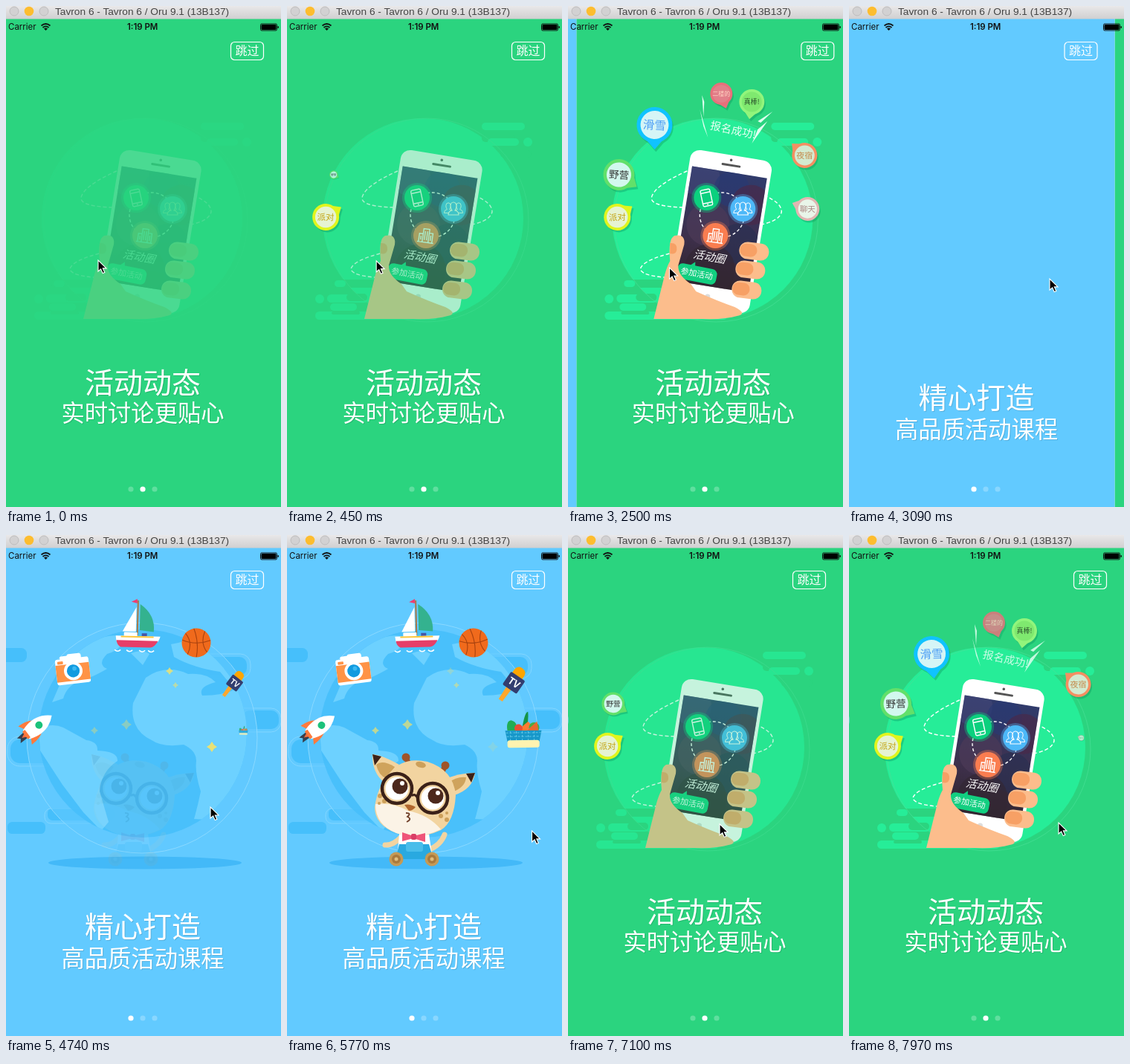
An HTML page for the animation above (8 s loop, 370 by 674 pixels).

```html
<!DOCTYPE html>
<html lang="zh">
<head>
<meta charset="utf-8">
<title>Onboarding</title>
<style>
  html, body { margin: 0; width: 100%; height: 100%; overflow: hidden; }
  svg { display: block; width: 100%; height: 100%; }
  text { font-family: "Noto Sans CJK SC", "Noto Sans CJK", sans-serif; text-anchor: middle; }
  .chrome text { font-family: Inter, sans-serif; text-anchor: start; }
  .head { fill: #fff; font-weight: 300; filter: drop-shadow(1px 1px 0 #0002); }
  .line { fill: none; stroke: #fff; stroke-width: 1.4; }
  .dash { stroke-dasharray: 5 3; }
</style>
</head>
<body>
<svg id="stage" viewBox="0 0 370 674"></svg>
<script>
const CYCLE = 8000, WIDTH = 370;
const clamp = v => Math.max(0, Math.min(1, v));

function track(keys, t) {
  let i = 1;
  while (i < keys.length - 1 && keys[i][0] < t) i++;
  const [a, b] = [keys[i - 1], keys[i]];
  const u = clamp((t - a[0]) / (b[0] - a[0]));
  return a.slice(1).map((v, k) => v + (b[k + 1] - v) * u);
}

const circle = (x, y, r, fill, more = '') => `<circle cx="${x}" cy="${y}" r="${r}" fill="${fill}" ${more}/>`;
const oval = (x, y, rx, ry, fill, more = '') => `<ellipse cx="${x}" cy="${y}" rx="${rx}" ry="${ry}" fill="${fill}" ${more}/>`;
const rect = (x, y, w, h, r, fill, more = '') => `<rect x="${x}" y="${y}" width="${w}" height="${h}" rx="${r}" fill="${fill}" ${more}/>`;
const shape = (d, fill, more = '') => `<path d="${d}" fill="${fill}" ${more}/>`;
const line = (d, more = 'class="line"') => `<path d="${d}" ${more}/>`;
const label = (x, y, size, fill, text, more = '') =>
  `<text x="${x}" y="${y}" font-size="${size}" fill="${fill}" ${more}>${text}</text>`;
const group = (transform, body, more = '') => `<g transform="${transform}" ${more}>${body}</g>`;

const page = (id, color, art, title, titleY, subtitle, subtitleY) => `<g id="${id}">
  ${rect(0, 17, WIDTH, 657, 0, color)}${art}
  ${rect(302.5, 48.5, 44, 24, 5, 'none', 'stroke="#fff" stroke-width="1.2"')}
  ${label(324.5, 66, 16, '#fff', '跳过', 'font-weight="300"')}
  ${label(184, titleY, 39, '#fff', title, 'class="head"')}
  ${label(184, subtitleY, 31.3, '#fff', subtitle, 'class="head"')}</g>`;

// A speech balloon centred on the origin; the tail points along `angle`.
function balloon(r, color, inner, ink, text, size, angle) {
  const tail = `M${r * .3} ${-r * .93}L${r * 1.38} 0L${r * .3} ${r * .93}Z`;
  return group('translate(2 3)', group(`rotate(${angle})`, shape(tail, '#0a8f5a')) + circle(0, 0, r - .5, '#0a8f5a'), 'opacity=".35"') +
    group(`rotate(${angle})`, shape(tail, color)) + circle(0, 0, r, color) +
    circle(0, 0, r * .79, inner) + label(0, size * .37, size, ink, text);
}

// ---------- green scene ----------
const greenBackdrop = () =>
  circle(183, 286, 135, '#26ed98') +
  rect(262, 157, 58, 10, 5, '#26ed98') + rect(262, 173, 45, 10, 5, '#2bd47f') +
  rect(270, 178, 42, 10, 5, '#26ed98') + rect(287, 194, 42, 10, 5, '#2bd47f') +
  circle(324, 183, 6, '#26ed98') + circle(44, 394, 6, '#26ed98') +
  rect(61, 368, 60, 11, 5.5, '#2bd47f') + rect(64, 369, 15, 9, 4.5, '#26ed98') +
  rect(54, 388, 55, 11, 5.5, '#26ed98') + rect(80, 387, 28, 10, 5, '#2bd47f') +
  rect(58, 400, 36, 10, 5, '#26ed98') + rect(38, 411, 165, 11, 5.5, '#26ed98') +
  rect(60, 411, 38, 4, 2, '#2bd47f') +
  circle(188, 288, 137, 'none', 'stroke="#48e096" opacity=".7"');

const peopleIcon = [-7, 7, 0].map(x =>
  group(`translate(${x} ${x ? 0 : 1}) scale(${x ? .8 : 1})`,
    shape('M-7 8Q-7 3 -2 2Q-4 -1 -4 -4A4 5 0 0 1 4 -4Q4 -1 2 2Q7 3 7 8Z', '#4db8f8', 'stroke="#fff" stroke-width="1.2"'))).join('');

const phone = () => group('translate(155 192) rotate(9.2)',
    rect(0, 0, 111, 208, 13, '#fff') +
    rect(4.5, 23, 102, 156, 0, 'url(#photo)') +
    `<g clip-path="url(#screen)">` +
      [[18, 36, 26, '#414677'], [62, 45, 24, '#283a73'], [91, 62, 27, '#4a2949'], [38, 97, 29, '#4d3b58'], [83, 116, 27, '#293052'], [50, 156, 34, '#332733']]
        .map(([x, y, r, c]) => circle(x, y, r, c, 'opacity=".65"')).join('') + `</g>` +
    rect(43, 12, 26, 3, 1.5, '#555') + circle(55, 6.5, 1.8, '#555') + circle(53, 193, 3.5, '#ddd')) +
  circle(196, 281, 30, 'none', 'class="line" stroke-dasharray="4 3"') +
  [[175, 258, '#0bd07e'], [224, 273, '#4db8f8'], [187, 309, '#fa7d50']]
    .map(([x, y, c]) => circle(x, y, 20, c, 'opacity=".35"') + circle(x, y, 17, c)).join('') +
  group('translate(175 258) rotate(-12)',
    rect(-6.5, -11, 13, 22, 2, 'none', 'class="line"') + line('M-6.5 -7H6.5M-6.5 7H6.5M-1 9H1')) +
  group('translate(224 272)', peopleIcon) +
  group('translate(187 309) rotate(8)', line('M-11 9H11M-9 9V-2H-4V9M-4 9V-9H4V9M4 -4H9V9M-1.5 -6V6M1.5 -6V6M-6.5 1V6M6.5 -1V6')) +
  group('translate(179 337) rotate(10)', label(0, 5.5, 14.6, '#fff', '活动圈', 'font-weight="500" font-style="italic"')) +
  group('translate(162 360) rotate(11)',
    rect(-27, -10, 54, 21, 7, '#12cf80') + shape('M-11 -9L-5 -15L-4 -9Z', '#12cf80') + label(0, 4, 11, '#fff', '参加活动'));

const finger = (x, y) => group(`translate(${x} ${y}) rotate(7)`,
  rect(-20, -11.5, 40, 23, 11, '#fcbd8c') + rect(-19, -9, 23, 17, 8, '#f7a065'));

const hand = () =>
  shape('M104 421L119 361Q122 350 126 343Q123 313 132 309Q147 306 145 321L137 349Q136 362 154 374L161 384Q190 397 213 405Q231 414 216 417Q200 422 170 421Z', '#fcbd8c') +
  shape('M126 319Q136 318 135 328Q134 335 126 333Z', '#f7a065') +
  [[239, 330], [234, 355], [229, 382]].map(p => finger(...p)).join('');

const orbits = [
  'M149 222Q104 242 101 258Q100 270 146 271',
  'M252 255Q276 264 276 277Q273 291 238 296',
  'M133 331Q88 342 86 354Q89 365 138 366'
].map(d => line(d, 'class="line dash"')).join('');

const banner =
  group('rotate(12)', label(0, 5, 14.5, '#eafff4', '报名成功!', 'font-weight="300"')) +
  ['M-42 -47L-39 -38L-40 -18Z', 'M-45 -28L-34 10L-40 -5Z', 'M53 -25L33 -12L37 -10Z', 'M46 -12L25 18L33 -1Z']
    .map(d => shape(d, '#dffff0')).join('');

const greenItems = [
  { x: 53, y: 284, start: 330, sway: -2, body: balloon(18, '#e0f51e', '#e6f3d2', '#c3a415', '派对', 11.5, -34) },
  { x: 61, y: 227, start: 580, sway: 4, body: balloon(21, '#62e06a', '#d2f8ee', '#333', '野营', 13.5, 30) },
  { x: 109, y: 160, start: 830, sway: 4, body: balloon(24, '#10c3ff', '#d5f5f6', '#4c9df5', '滑雪', 15.5, 86) },
  { x: 195, y: 118, start: 1090, fade: 650, body: balloon(15, '#e8707b', '#e2808a', '#ffd2c0', '二楼的', 8, 72) },
  { x: 236, y: 129, start: 900, fade: 650, body: balloon(17, '#92f57c', '#7fe96f', '#28502b', '真棒!', 9, 98) },
  { x: 211, y: 167, start: 1090, fade: 650, body: banner },
  { x: 308, y: 201, start: 1330, sway: 1, body: balloon(17, '#f58f62', '#d3ead0', '#c58a4d', '夜宿', 11, 222) },
  { x: 312, y: 273, start: 1580, sway: 1, body: balloon(16, '#e0b6b2', '#e9f5e9', '#a98480', '聊天', 10.5, 200) }
];

// ---------- blue scene ----------
const DEEP = '#46bffb', LAND = '#6dd1ff';
const blueBackdrop = () =>
  oval(187, 441, 130, 8.5, '#43b9f8') +
  [[-10, 152, 38, 19], [6, 275, 60, 32], [56, 367, 90, 17], [2, 386, 51, 16], [270, 164, 54, 25], [318, 236, 49, 25]]
    .map(([x, y, w, h]) => rect(x, y, w, h, h / 2.5, DEEP)).join('') +
  [[2, 271, 70, 40], [52, 368, 80, 20], [255, 160, 74, 33], [288, 233, 82, 32]]
    .map(([x, y, w, h]) => rect(x, y, w, h, h / 2.4, 'none', 'stroke="#82d6ff"')).join('') +
  circle(183, 273, 155, '#62caff', 'fill-opacity=".6" stroke="#8ad9ff"') +
  circle(184, 267, 140, DEEP, 'opacity=".85"') +
  `<g clip-path="url(#globe)">` + [
    'M44 262Q60 252 77 259L108 276Q124 278 123 290Q151 291 150 304Q128 318 126 345L138 386L128 398L104 373L76 336L46 290Z',
    'M62 225L88 165Q130 128 156 137Q158 154 136 160Q122 174 136 180Q112 194 100 195Q81 204 77 220Z',
    'M188 192Q215 173 245 187Q270 185 282 198Q258 204 264 216Q292 216 310 207L335 220V320L300 385L253 382Q258 365 262 345Q254 320 256 304Q256 290 239 282Q210 286 196 276Q166 262 171 226Z',
    'M222 147Q250 142 262 130L335 170V230L308 208L288 184Q250 178 226 164Z',
    'M168 159Q183 153 193 160L184 175Z'
  ].map(d => shape(d, LAND)).join('') + `</g>`;

const rocket = group('translate(2 0) rotate(-36) scale(.9)',
  shape('M-18 -5L-32 -4L-28 0L-32 5L-18 5Z', '#38404d') + shape('M-17 -4L-26 0L-17 4Z', '#ff6b3a') +
  shape('M-15 -8L-20 -17Q-2 -17 5 -9Z', '#ff7a3c') + shape('M-15 8L-20 17Q-2 17 5 9Z', '#ff7a3c') +
  shape('M-18 -8Q10 -19 30 0Q10 19 -18 8Z', '#fff') + rect(-20, -7, 5, 14, 1, '#ff7a3c') + circle(6, 0, 5.5, '#1bc27b'));

const camera = group('rotate(-7) scale(.96)',
  rect(-16, -20, 13, 6, 2, '#fff') + rect(-6, -22, 20, 9, 3, '#fff') + rect(-23, -16, 47, 36, 3, '#fff') +
  rect(-23, -8, 47, 24, 0, '#ff9346') + rect(-20, -13, 8, 4, 1, '#ff9346') +
  circle(1, 2, 13, '#fff') + circle(1, 2, 9, '#129be0') + circle(3, -1, 3, '#3cb9f2'));

const boat =
  rect(-1, -34, 2, 47, 0, '#a87945') + shape('M-1 -36L-9 -32L-1 -30Z', '#ee3d72') +
  shape('M-2 -25L-20 8H-2Z', '#fff') + shape('M3 -29Q24 -15 22 8L3 6Z', '#34b28f') +
  rect(-18, 9, 18, 6, 1, '#fff') + rect(6, 10, 7, 5, 0, '#4556a5') +
  shape('M-29 14H31Q30 18 28 21H-28Z', '#fff') + shape('M-22 14H22V16H-22Z', '#ffc83d') +
  shape('M-28 20H28Q24 28 18 29H-22Q-27 27 -28 20Z', '#e63e68') +
  [-25, -9, 8, 20].map(x => line(`M${x - 5} 33q4 4 8 0`, 'fill="none" stroke="#fff" stroke-width="1.5"')).join('');

const ball = circle(0, 0, 19.5, '#f06a1c') +
  line('M-19 -3Q0 4 19 -4M-4 -19Q4 0 1 19M-15 -12Q-4 0 -11 16M11 -16Q5 0 15 12', 'fill="none" stroke="#a9420f" stroke-width="1.1"');

const mic = group('rotate(36)',
  shape('M-4 2H4L3 27H-3Z', '#ffa72c') + rect(-8, -25, 16, 20, 7, '#ffa500') + rect(-10, -13, 23, 21, 2, '#333e70') +
  label(1.5, 2, 13, '#fff', 'TV', 'font-weight="700"'));

const basket =
  shape('M-2 -4Q2 -26 6 -25Q7 -12 3 -2Z', '#159447') + shape('M-22 0Q-24 -13 -17 -14Q-8 -12 -9 0Z', '#21ad54') +
  shape('M-10 1L6 -12L11 -7L1 3Z', '#ff7a31') + circle(-7, -3, 5.5, '#e84e36') + circle(14, -4, 7, '#49ad45') + shape('M4 0L18 -12L20 1Z', '#e8692f') +
  shape('M-25 0H24L21 15H-22Z', '#1797c9') + line('M-24 3H23M-23 8H22M-18 1V14M-10 1V14M-2 1V14M6 1V14M14 1V14', 'stroke="#5cc6e8" stroke-dasharray="3 2"') +
  rect(-22, 13, 43, 10, 3, '#fff3b0');

const blueItems = [
  { x: 39, y: 259, start: 560, sway: -1, body: rocket },
  { x: 89, y: 181, start: 740, sway: .3, body: camera },
  { x: 175.5, y: 122, start: 920, sway: 1.5, body: boat },
  { x: 253.5, y: 145, start: 1100, sway: 2.5, body: ball },
  { x: 304, y: 200, start: 1300, sway: 1.5, body: mic },
  { x: 319, y: 263, start: 1435, sway: .5, body: basket }
];

const stars = [[162, 255, 7, 2], [119, 263, 5, 2], [220, 183, 5, .8], [228, 202, 4, 1.5], [277, 285, 7, 0]];
const star = ([x, y, r]) => group(`translate(${x} ${y})`,
  shape(`M0 ${-r}L${r * .4} ${-r * .4}L${r} 0L${r * .4} ${r * .4}L0 ${r}L${-r * .4} ${r * .4}L${-r} 0L${-r * .4} ${-r * .4}Z`, '#ffe45c'), 'class="star"');

const eye = (x, y) => circle(x, y, 20, '#f2d4a0', 'stroke="#3b2118" stroke-width="4.5"') +
  circle(x, y, 15.5, '#fff') + circle(x + 4, y - 3, 10.5, '#4c281c') + circle(x + 7, y - 7, 3, '#fff');
const shoe = x => circle(x, 436, 9.5, '#c59a55') + circle(x, 436, 6, '#a97a3d') + circle(x, 436, 2.5, '#dfbd7d');

const giraffe = () =>
  line('M153 407Q142 418 132 417M190 424Q207 417 212 403', 'fill="none" stroke="#f2d4a0" stroke-width="7" stroke-linecap="round"') +
  shape('M151 402H191L196 436H148Z', '#fff') + shape('M151 416H191L197 436H146Z', '#29a9e0') + rect(160, 413, 23, 13, 3, '#49bdea') +
  shoe(147) + shoe(195) +
  line('M167 318L161 301M205 327L212 312', 'stroke="#9f5429" stroke-width="7" stroke-linecap="round"') +
  circle(160, 299, 5.5, '#9f5429') + circle(213, 310, 5.5, '#9f5429') +
  shape('M151 309Q128 296 115 295Q114 320 132 334Z', '#f2d4a0') + shape('M115 295L127 298L118 310Z', '#3b2118') + shape('M145 312Q128 302 120 309Q123 323 134 328Z', '#cfa35c') +
  shape('M210 330Q229 320 253 320Q250 342 225 350Z', '#f2d4a0') + shape('M253 320L241 321L248 333Z', '#3b2118') + shape('M215 334Q230 324 241 326Q240 339 224 345Z', '#cfa35c') +
  shape('M139 319Q157 298 189 305Q224 316 227 350Q225 386 207 397Q177 411 147 401Q118 390 118 366Q122 337 139 319Z', '#f2d4a0') +
  shape('M119 362Q142 359 163 371Q190 376 207 396Q176 411 147 401Q119 390 119 362Z', '#fbf3e6') +
  oval(180, 309, 7, 4, '#cda05a', 'transform="rotate(15 180 309)"') +
  [[125, 351, 3], [131, 358, 3], [124, 361, 2], [207, 378, 3], [215, 383, 3], [215, 374, 2]]
    .map(([x, y, r]) => circle(x, y, r, '#cda05a')).join('') +
  eye(148, 341) + eye(196, 354) +
  line('M168 351Q172 347 176 354', 'fill="none" stroke="#3b2118" stroke-width="3"') +
  shape('M158 363Q165 361 173 366Q169 371 164 371Z', '#b1672e') +
  line('M160 374Q168 374 162 379Q169 382 161 386', 'fill="none" stroke="#70402a" stroke-width="1.8"') +
  shape('M170 405L155 400V412L170 408L186 413V401Z', '#ef5579') + rect(167, 402, 7, 8, 2, '#d93e66');

// ---------- assembly ----------
const items = list => list.map(i => `<g class="item">${i.body}</g>`).join('');

const chrome = `<g class="chrome">
  ${rect(0, 0, WIDTH, 17.5, 0, 'url(#bar)')}
  ${circle(11, 7, 6, '#d2d1d2', 'stroke="#bdbcbd"')}${circle(31, 7, 6.3, '#fdbd2f')}${circle(51, 7, 6, '#d2d1d2', 'stroke="#bdbcbd"')}
  ${label(66, 12, 13.7, '#444', 'Tavron 6 - Tavron 6 / Oru 9.1 (13B137)', 'style="font-family:\'Liberation Sans\',sans-serif"')}
  ${label(3, 32, 11.5, '#111', 'Carrier')}
  ${label(163, 32, 11.4, '#111', '1:19 PM', 'font-weight="600"')}
  <g fill="none" stroke="#111" stroke-width="1.7">${line('M47.5 26.5Q53.5 21.5 59.5 26.5M49.5 29Q53.5 25.7 57.5 29', '')}</g>
  ${shape('M51 30.5Q53.5 28.5 56 30.5L53.5 33Z', '#111')}
  ${rect(342.5, 24, 22, 9, 1.5, 'none', 'stroke="#111"')}${rect(343.5, 25, 20, 7, 1, '#000')}${rect(365.5, 27, 1.5, 3, .7, '#111')}</g>`;

const stage = document.getElementById('stage');
stage.innerHTML = `<defs>
  <linearGradient id="bar" x2="0" y2="1"><stop stop-color="#e9e8e9"/><stop offset="1" stop-color="#d0cfd0"/></linearGradient>
  <linearGradient id="photo" x2="0" y2="1"><stop stop-color="#303b6b"/><stop offset=".6" stop-color="#3e304c"/><stop offset="1" stop-color="#30252d"/></linearGradient>
  <clipPath id="screen">${rect(4.5, 23, 102, 156, 0, '#000')}</clipPath>
  <clipPath id="globe">${circle(184, 267, 140, '#000')}</clipPath></defs>` +
  page('green', '#2bd47f', `<g class="backdrop">${greenBackdrop()}${orbits}${phone()}${hand()}</g>${items(greenItems)}`,
    '活动动态', 521, '实时讨论更贴心', 559) +
  page('blue', '#62caff', `<g class="backdrop">${blueBackdrop()}${stars.map(star).join('')}</g><g id="giraffe">${giraffe()}</g>${items(blueItems)}`,
    '精心打造', 541, '高品质活动课程', 581) +
  [168, 184, 200].map(x => circle(x, 650, 3.6, '#fff', 'class="dot"')).join('') + chrome +
  `<path id="cursor" d="M0 0V15L3.6 11.8L6.2 17.6L8.8 16.5L6.3 10.9H11Z" stroke="#fff" stroke-width="1.1"/>`;

const all = selector => [...stage.querySelectorAll(selector)];
const one = selector => stage.querySelector(selector);
const scenes = [
  { root: one('#green'), items: greenItems, swing: age => Math.sin((age - 1510) / 1500 * 2 * Math.PI), tilt: -1 },
  { root: one('#blue'), items: blueItems, swing: age => Math.cos((age - 1500) / 2060 * 2 * Math.PI), tilt: 1 }
];
for (const scene of scenes) {
  scene.backdrop = scene.root.querySelector('.backdrop');
  scene.nodes = [...scene.root.querySelectorAll('.item')];
}
const dots = all('.dot'), starNodes = all('.star'), giraffeNode = one('#giraffe'), cursor = one('#cursor');

// Swipe progress: 0 shows the green page, 1 the blue page.
const swipeKeys = [[2450, 0], [2650, .12], [2800, .5], [2950, .85], [3090, .966], [3240, 1],
  [5780, 1], [5920, .85], [6050, .45], [6200, .08], [6330, 0]];
const cursorKeys = [[0, 124, 342], [1180, 114, 344], [2450, 118, 350], [2800, 245, 364], [3090, 270, 367], [4740, 275, 366],
  [5770, 330, 398], [6050, 200, 392], [6510, 175, 390], [7000, 195, 389], [7970, 282, 387]];

function drawScene(scene, x, age) {
  scene.root.setAttribute('transform', `translate(${x})`);
  scene.backdrop.setAttribute('opacity', clamp(age / 1000) ** 1.2);
  scene.items.forEach((item, i) => {
    const shown = clamp((age - item.start) / (item.fade || 260));
    const scale = item.fade ? 1 : shown;
    const shift = (item.sway || 0) * scene.swing(age);
    scene.nodes[i].setAttribute('opacity', item.fade ? shown : clamp(shown * 3));
    scene.nodes[i].setAttribute('transform',
      `translate(${item.x + shift} ${item.y}) rotate(${shift * scene.tilt}) scale(${scale})`);
  });
}

function draw(t) {
  const [swipe] = track(swipeKeys, t);
  const blueAge = t - 3240;
  drawScene(scenes[0], swipe * WIDTH, t < 5000 ? t + 200 : t - 6330);
  drawScene(scenes[1], (swipe - 1) * WIDTH, blueAge);
  giraffeNode.setAttribute('opacity', clamp((blueAge - 1435) / 900));
  starNodes.forEach((node, i) =>
    node.setAttribute('opacity', .5 + .35 * Math.cos((blueAge - 1500) / 330 + stars[i][3])));
  dots.forEach((dot, i) => dot.setAttribute('opacity', i === (swipe > .5 ? 0 : 1) ? 1 : .25));
  cursor.setAttribute('transform', `translate(${track(cursorKeys, t).join(' ')})`);
}

const origin = performance.now();
function frame() {
  draw((performance.now() - origin) % CYCLE);
  requestAnimationFrame(frame);
}
frame();
</script>
</body>
</html>
```
